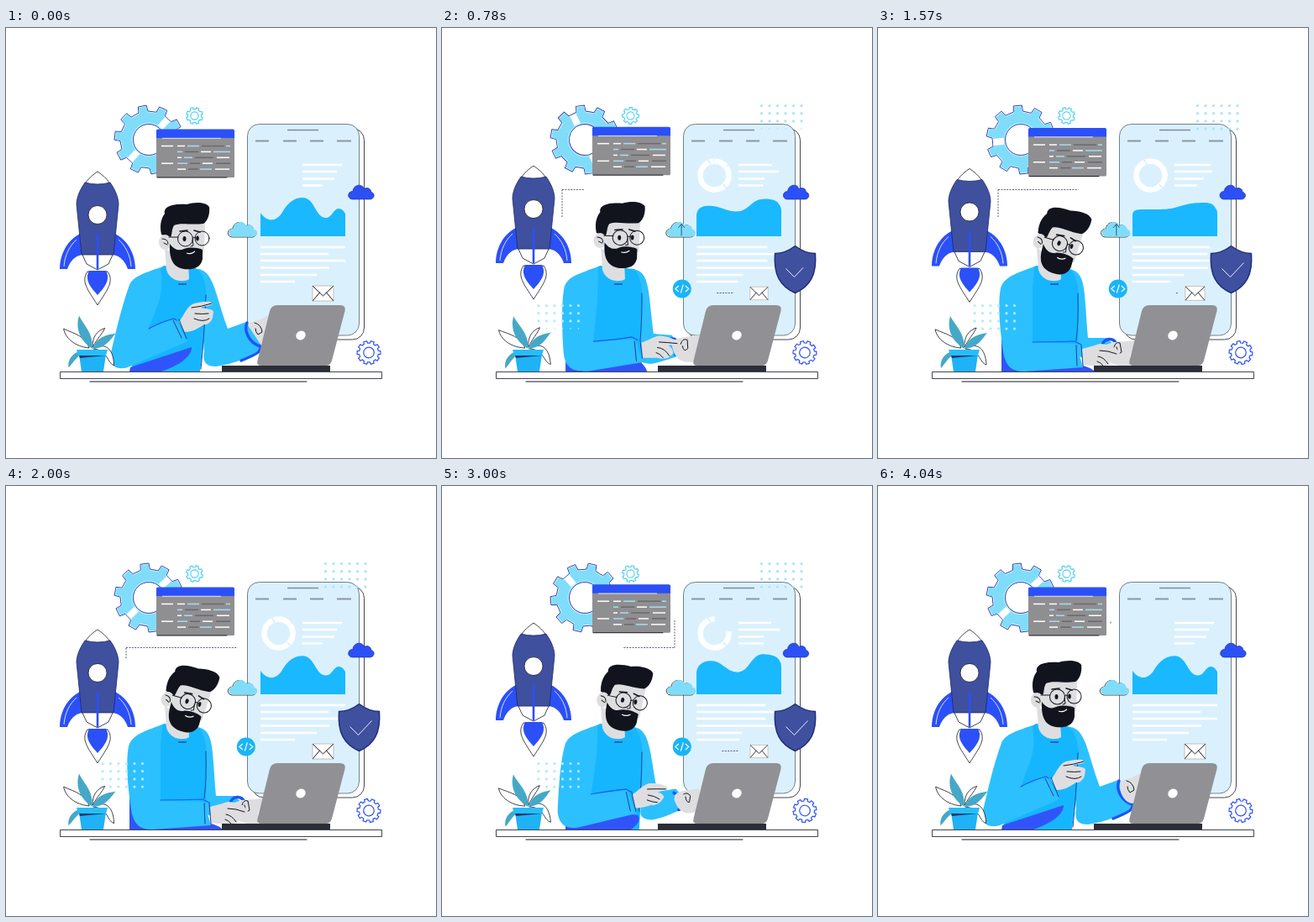
An HTML page for the animation above (4.09 s loop, 512 by 512 pixels).

```html
<!DOCTYPE html>
<html lang="en">
<head>
<meta charset="utf-8">
<title>Developer at work</title>
<style>
  html, body { margin: 0; width: 100%; height: 100%; overflow: hidden; background: #fff; }
  svg { display: block; width: 100vw; height: 100vh; }
  .ink { fill: none; stroke: #15171f; stroke-width: 1; stroke-linecap: round; stroke-linejoin: round; }
  .line { fill: #fff; stroke: #15171f; stroke-width: .8; stroke-linejoin: round; }
  .skin { fill: #dedee0; }
  .hair { fill: #11141d; }
  .sleeve { fill: #2cc0ff; }
  .shirt { fill: #16b6ff; }
  .royal { fill: #2b50f8; }
  .cyan { fill: #80ddfa; }
  .edge { fill: none; stroke: #1c55f5; stroke-width: 1.2; stroke-linecap: round; }
  .dots { fill: none; stroke: #57607a; stroke-width: 1; stroke-dasharray: 2 1.4; }
  .white { fill: none; stroke: #fff; }
</style>
</head>
<body>
<svg viewBox="0 0 512 512">
  <defs>
    <path id="cloud" d="M5 18C-2 17-1 8 6 8C7-1 19-2 21 5C26 2 31 6 30 9C36 10 35 18 29 18Z"/>
    <path id="fin" d="M88 245C74 252 64 268 64 287L73 287C76 278 82 271 91 270Z"/>
  </defs>

  <!-- gears -->
  <g id="bigGear">
    <path data-gear="10 41 34 7 9.5" fill="#fff" stroke="#2038a8" stroke-width=".9"/>
    <path data-gear="10 39.800 32.800 6.500 9" class="cyan"/>
    <path d="M0-33V-20M0 33V20" class="white" stroke-width="8"/>
    <circle r="20" fill="#c9f0fc"/>
    <circle r="18.500" fill="#fff" stroke="#2038a8" stroke-width=".9"/>
  </g>
  <g id="topGear" fill="none" stroke="#45cdf5" stroke-width="1.1">
    <path data-gear="8 10 8 9 13"/><circle r="4.600"/>
  </g>
  <g id="lowGear" fill="none" stroke="#2b50f8" stroke-width="1.2">
    <path data-gear="10 14 11.5 8 11"/><circle r="6.300"/>
  </g>

  <!-- code window -->
  <path id="route" class="dots"/>
  <g id="win">
    <rect x="179" y="121" width="93" height="57" rx="1.500" fill="#8f8f92"/>
    <path d="M180 178H263" class="ink"/>
    <path d="M179 131V122.500Q179 120.500 181 120.500H270Q272 120.500 272 122.500V131Z" class="royal"/>
    <path d="M186 131.300H256" class="white" stroke="#c8cbe0" stroke-width=".8"/>
    <g id="code" stroke-width="1.500"></g>
  </g>

  <!-- phone -->
  <rect x="293" y="119.500" width="133.500" height="251.500" rx="14" class="line"/>
  <rect x="287.500" y="114.500" width="133" height="251.500" rx="14" fill="#daf1fd" stroke="#55606e" stroke-width=".8"/>
  <path d="M335 121.500H372" stroke="#7d8b96" stroke-width="1.400"/>
  <path d="M297 134.500h16M330 134.500h16M362 134.500h16M394 134.500h17" stroke="#8b979f" stroke-width="1.800"/>
  <path id="chart" fill="#1ab8ff"/>
  <path id="text" class="white" stroke-width="2.600"/>
  <path id="ring" class="white" stroke-width="6.500"/>
  <path d="M316 156l4 6M339 164l5-3M335 186l4 5" stroke="#daf1fd" stroke-width="1.800"/>
  <path id="link" class="dots"/>
  <g id="mail"><path d="M-12.500-9H12.500V9H-12.500Z" fill="#fff" stroke="#b9aea6" stroke-width=".8"/>
    <path d="M-12-8.500L0 3L12-8.500M-12 8.500L-4-1M12 8.500L4-1" class="ink" stroke-width=".8"/></g>

  <g id="shield">
    <path d="M0-28C8-22 16-19 24-19C26 6 18 20 0 28C-18 20-26 6-24-19C-16-19-8-22 0-28Z" fill="#3f509f" stroke="#202c78" stroke-width="1.400"/>
    <path id="check" d="M-11-1L-1 9L15-8" class="white" stroke-width=".9" pathLength="1"/>
  </g>
  <g id="badge"><circle r="11" fill="#1ab4fb"/>
    <path d="M-4-3.500L-8 0L-4 3.500M4-3.500L8 0L4 3.500M1.500-5L-1.500 5" class="white" stroke-width="1.100"/></g>

  <!-- clouds -->
  <g id="leftCloud"><use href="#cloud" class="line" x="-1" y=".5"/><use href="#cloud" class="cyan"/>
    <path id="arrow" d="M17.500 16.500V3M14 7L17.500 3L21 7" class="ink" style="stroke:#1d5f80"/></g>
  <g id="rightCloud"><use href="#cloud" class="royal" transform="scale(.9 .95)" stroke="#2030a8" stroke-width=".8"/></g>

  <!-- rocket -->
  <g id="rocket">
    <path d="M97 290C89 302 97 311 109 330C121 311 129 302 121 290Z" class="line"/>
    <path d="M99 289H119C125 300 117 309 109 318C101 309 93 300 99 289Z" class="royal"/>
    <g id="wing"><use href="#fin" class="royal"/><path d="M69 284C70 270 76 259 84 252" class="white" stroke-width=".8"/></g>
    <use href="#wing" transform="matrix(-1 0 0 1 218 0)"/>
    <path d="M90 268L96 281L109 288L122 281L128 268Z" class="line"/>
    <path d="M109 171C100 177 95 183 93 188H125C123 183 118 177 109 171Z" class="line"/>
    <path d="M94 184Q109 188 124 184C131 194 134 203 134 210L128 270H90L84 210C84 203 87 194 94 184Z" fill="#3f509f" stroke="#1c2764" stroke-width=".8"/>
    <circle cx="109" cy="222.500" r="11" class="line"/>
    <path d="M109 246V286" stroke="#2b50f8" stroke-width="2.600" stroke-linecap="round"/>
  </g>

  <!-- man -->
  <path data-pose="farArm" class="sleeve"/>
  <path data-pose="farCuff" class="edge" style="stroke-width:3.400"/>
  <path data-pose="farHand" class="skin"/>
  <path data-pose="farLines" class="ink"/>
  <path data-pose="torso" class="shirt"/>
  <path data-pose="shade" fill="#3154fa"/>
  <path data-pose="seam" class="ink" style="stroke:#164a9c"/>
  <path d="M189 262L217 278L218 299C212 303 196 303 191 288Z" class="skin"/>
  <path d="M205 305H215" stroke="#164a9c" stroke-width="1.400"/>
  <g id="head">
    <path d="M195 232L237 230L236 268L198 272Z" class="skin"/>
    <path d="M185 246C182 233 186 225 189 221C187 212 200 209 215 210C225 207 238 207 242 213C243 222 240 230 235 233C220 235 208 231 200 235C197 240 198 246 196 249Z" class="hair"/>
    <ellipse cx="189.500" cy="255" rx="7.500" ry="9" class="skin"/>
    <path d="M186 251Q193 251 193 257M188 256L192 258" class="ink"/>
    <path d="M195 257C200 264 206 266 212 263C220 260 230 262 234 264V275C232 287 220 288 212 287C200 285 194 277 195 257Z" class="hair"/>
    <path d="M215 268Q220 270 225 266" class="white" stroke-width="1.200"/>
    <g class="ink"><circle cx="213.500" cy="251" r="9"/><circle cx="233.500" cy="250.500" r="8.500"/>
      <path d="M222 250Q224 248 226 250M205 249L194 249M222 252L223 259L220 260"/></g>
    <path d="M207 242L216 241M224 241L231 243" class="ink" style="stroke-width:1.600"/>
    <ellipse cx="212.500" cy="251" rx="2" ry="3" class="hair"/>
    <ellipse cx="228" cy="250.500" rx="1.800" ry="3" class="hair"/>
  </g>
  <path data-pose="hand" class="skin"/>
  <path data-pose="fingers" class="ink"/>
  <path data-pose="arm" class="sleeve"/>
  <path data-pose="fold" class="edge"/>
  <path data-pose="cuff" class="ink" style="stroke:#153f9a"/>
  <g id="dotGrids"></g>

  <!-- desk -->
  <path d="M323 330H398Q405 330 403.500 337L388 396Q386 402 381 402H304Q298 402 299.500 396L314 337Q316 330 323 330Z" fill="#919195"/>
  <ellipse cx="351" cy="366" rx="6" ry="5.300" transform="rotate(-40 351 366)" fill="#fff"/>
  <path d="M257 402H386V409H257Z" fill="#2b2d37"/>
  <path d="M64.500 409.500H447.500V417.500H64.500Z" class="line"/>
  <path d="M100 421H358" class="ink"/>

  <!-- plant -->
  <g id="leaves">
    <path d="M99 381C94 367 82 365 68 359C70 370 82 380 99 381ZM103 380C102 368 108 360 117 357C114 364 108 370 103 380Z" class="line"/>
    <path d="M104 382C116 374 128 379 129 401C120 398 122 383 104 382Z" class="line"/>
    <path d="M103 382C86 372 82 356 86 343C92 355 103 362 103 382ZM103 382C108 368 118 365 130 363C124 370 119 381 103 382ZM99 383C84 383 73 392 75 405C81 399 84 390 99 383Z" fill="#45a8c8"/>
  </g>
  <path d="M87 389H119L116 409H90Z" fill="#1fb2f6"/>
  <path d="M87 390H119L88 393Z" fill="#123b6b"/>
  <path d="M84 383H121L119 390H86Z" fill="#27bdf8"/>
</svg>
<script>
const LOOP = 4090;
const $ = id => document.getElementById(id);
const set = (id, name, value) => $(id).setAttribute(name, value);
const clamp = x => Math.max(0, Math.min(1, x));
const ramp = (t, from, to) => clamp((t - from) / (to - from));
const ease = x => x * x * (3 - 2 * x);

// Blends every number of two strings with the same layout.
function mix(a, b, k) {
  const ends = b.match(/-?[\d.]+/g);
  let i = 0;
  return a.replace(/-?[\d.]+/g, n => (+n + (ends[i++] - n) * k).toFixed(2));
}
function track(keys, t) {
  const i = Math.max(1, keys.findIndex(key => key[0] >= t));
  const [from, a] = keys[i - 1], [to, b] = keys[i];
  return mix(a, b, ease(ramp(t, from, to)));
}

// Each part: hand raised, sitting up, typing.
const poses = {
  farArm: ['M228 287C248 288 250 322 264 358L286 350L306 375C303 390 270 400 250 403C236 403 234 395 236 385L228 287Z',
    'M228 287C247 290 246 315 254 358L276 362L290 398C280 404 262 406 250 408C236 408 232 405 233 398L228 287Z',
    'M228 287C248 291 245 310 250 369L272 369L284 380C270 384 262 390 250 393C240 393 236 390 237 385L228 287Z'],
  farHand: ['M288 354C292 348 300 349 305 346L318 339L310 370L304 378C294 378 287 366 288 354Z',
    'M279 368C284 360 296 362 310 357L305 380L300 392C290 394 282 390 279 368Z',
    'M268 380C276 372 292 374 306 372L300 390L300 402C280 404 272 398 268 380Z'],
  farCuff: ['M287 351C283 360 289 375 303 379C304 385 300 388 280 396',
    'M275 364C283 366 290 380 291 390C291 398 282 401 272 403',
    'M267 377C270 369 280 368 284 376C284 377 283 377 283 377'],
  farLines: ['M296 351Q304 353 305 362L300 365Q297 362 297 358', 'M288 372Q290 364 297 367L296 376Q290 384 289 377', 'M281 380Q283 373 288 375L290 386Q286 390 284 380'],
  torso: ['M188 283L226 286C234 290 238 304 239 318C238 345 235 380 231 409L148 409C160 370 165 330 160 300Z',
    'M188 283L228 287C234 291 238 304 238 318C238 345 236 380 232 409L148 409C160 370 165 330 160 300Z',
    'M188 283L229 287C235 292 238 304 239 318C239 345 238 380 238 409L148 409C148 370 160 330 160 300Z'],
  shade: ['M147 409L148 404L221 380C221 392 205 402 185 409Z', 'M147 409L148 403L228 392C230 400 229 405 228 409Z', 'M147 409L147 362L244 402C250 404 255 405 258 409Z'],
  seam: ['M238 318Q236 370 232 406', 'M238 316Q237 350 236 372', 'M238 316Q239 350 236 372'],
  hand: ['M206 350C212 342 216 330 224 328C232 326 243 324 246 328C246 331 236 331 232 333C238 334 247 335 247 338L246 345C244 350 240 354 236 353C228 358 222 362 213 362Z',
    'M231 366C240 362 244 356 252 355C262 356 272 358 276 361C276 364 266 364 262 365C268 368 272 375 270 378L266 382C262 384 256 384 254 382C248 382 242 382 233 383Z',
    'M243 382C252 380 258 378 264 376C274 376 286 382 288 386C289 389 280 388 276 389C280 392 280 396 278 398L272 402C266 403 262 403 260 402C254 402 250 402 244 401Z'],
  fingers: ['M221 333Q232 332 245 328M225 340Q234 341 241 340M224 346Q235 351 242 346', 'M252 362Q262 363 275 361M250 368Q261 368 267 379M248 374Q254 376 258 382', 'M264 384Q274 384 284 388M262 391Q269 392 274 400M261 397Q265 398 268 402'],
  arm: ['M184 285C160 293 151 297 147 306C138 330 130 365 124 391C124 405 135 407 145 404L216 373L201 346L170 358C176 340 184 325 185 310C186 300 184 290 184 285Z',
    'M186 284C165 292 148 295 145 308C141 330 140 365 140 391C141 406 150 410 175 408L233 391L222 364L176 372C180 350 186 330 187 312C187 300 186 290 186 284Z',
    'M186 284C165 292 150 296 146 310C142 330 146 365 149 385C152 404 160 409 175 409L244 404L236 376L184 374C184 350 184 330 184 312C185 300 186 290 186 284Z'],
  fold: ['M170 358Q184 350 200 346L203 348', 'M176 372Q198 369 216 362L222 365', 'M184 374Q210 374 234 373L242 377'],
  cuff: ['M199 348L209 369M206 347L215 370', 'M221 367L225 390M229 366L232 383', 'M236 378L237 402M242 378L244 402']
};
const poseTimes = [[0, 0], [480, 1], [1050, 2], [2650, 2], [3400, 0], [LOOP, 0]];
const headKeys = [[0, 0, 0, 0], [480, -4, -5.5, -6], [1090, 1, 3, 9], [1570, 0, 5, 16], [2520, 0, 5, 16], [3480, 1, 2.5, 6], [LOOP, 0, 0, 0]]
  .map(([t, x, y, turn]) => [t, `translate(${x} ${y}) rotate(${turn} 213 262)`]);
const hills = ['M303 220C310 230 320 232 328 221C336 206 345 202 353 202C368 202 368 226 381 226C388 226 390 215 396 215C400 215 402 218 404 221V248H303Z',
  'M303 222C304 216 309 216 315 216C330 216 345 217 354 214C364 211 372 208 382 208C394 207 399 209 401 213C403 216 404 218 404 220V248H303Z',
  'M303 222C305 210 314 208 321 208C334 208 338 222 352 222C366 222 368 200 382 200C392 200 400 203 402 208C404 210 404 213 404 216V248H303Z'];
const hillKeys = [0, 1, 2, 1, 0].map((shape, i) => [i * LOOP / 8, hills[shape]]);
// x, y, and the two reaches each text line swings between
const textLines = [[353, 163, 400, 392], [353, 171, 394, 402], [353, 179.5, 391, 383], [353, 187.5, 377, 383],
  [303, 261, 404, 385], [303, 269, 384, 403], [303, 277, 404, 385], [303, 285.5, 385, 403], [303, 294, 370, 357], [303, 302, 344, 354]];

for (const el of document.querySelectorAll('[data-gear]')) {
  const [count, outer, root, tip, base] = el.dataset.gear.split(' ').map(Number);
  const points = [];
  for (let i = 0; i < count; i++)
    for (const [r, off] of [[root, -base], [outer, -tip], [outer, tip], [root, base]]) {
      const a = ((i + .5) * 360 / count + off) * Math.PI / 180;
      points.push((r * Math.sin(a)).toFixed(2) + ' ' + (-r * Math.cos(a)).toFixed(2));
    }
  el.setAttribute('d', 'M' + points.join('L') + 'Z');
}

// Code lines: start, tone, width
const tones = { w: '#fff', c: '#a5ddf3', d: '#6a6a6e' };
['185w14 204w9 216c14 233d27 262c5', '204c6 213d16 232w12 247c20', '204w5 212c10 225d22 251w15',
  '185w14 204c12 219d12 234w12 250d17', '204w10 217d12 231c14 249w17'].forEach((row, i) => {
  for (const [, x, tone, width] of row.matchAll(/(\d+)([wcd])(\d+)/g))
    $('code').innerHTML += `<path d="M${x} ${140.5 + 6.9 * i}h${width}" stroke="${tones[tone]}"/>`;
});

const dots = [];
for (const [x, y, fill] of [[380.5, 92.5, '#a8e4fa'], [115, 330.5, '#b5eafc']])
  for (let i = 0; i < 24; i++) {
    const dot = document.createElementNS('http://www.w3.org/2000/svg', 'circle');
    const row = Math.floor(i / 6);
    dot.setAttribute('cx', x + i % 6 * 9.5);
    dot.setAttribute('cy', y + row * 9.2);
    dot.setAttribute('fill', fill);
    $('dotGrids').append(dot);
    dots.push([dot, row]);
  }

// Piece of a bent line between two distances from its start.
function trim(points, from, to) {
  let at = 0, d = '';
  for (let i = 1; i < points.length; i++) {
    const [x, y] = points[i - 1], [u, v] = points[i];
    const length = Math.hypot(u - x, v - y);
    const a = clamp((from - at) / length), b = clamp((to - at) / length);
    if (b > a) d += `M${x + (u - x) * a} ${y + (v - y) * a}L${x + (u - x) * b} ${y + (v - y) * b}`;
    at += length;
  }
  return d;
}
function arc(cx, cy, r, from, to) {
  if (to - from < .01) return '';
  const points = [];
  for (let i = 0; i <= 48; i++) {
    const a = (from + (to - from) * i / 48) * 2 * Math.PI;
    points.push((cx + r * Math.sin(a)).toFixed(2) + ' ' + (cy - r * Math.cos(a)).toFixed(2));
  }
  return 'M' + points.join('L');
}
const place = (id, x, y, scale = 1, turn = 0) =>
  set(id, 'transform', `translate(${x} ${y}) rotate(${turn}) scale(${scale})`);

function draw(t) {
  const half = t % (LOOP / 2);
  const swing = (1 - Math.cos(t / LOOP * 4 * Math.PI)) / 2;
  const turn = 360 * t / LOOP;

  place('bigGear', 170, 133, 1, 43 - turn);
  place('topGear', 224.5, 104.5, 1, turn);
  place('lowGear', 432, 386.5, 1, -turn);
  place('rocket', 0, -8 * swing);
  place('win', 0, -3.3 * swing);
  place('leftCloud', 265 + 3 * swing, 230.5);
  place('rightCloud', 407.5 - 1.5 * swing, 186.8);
  place('mail', 377.5, 316, 1 - .16 * swing);
  set('leaves', 'transform', `rotate(${1.5 - 3 * swing} 102 384)`);

  set('chart', 'd', track(hillKeys, half));
  set('text', 'd', textLines.map(([x, y, a, b]) => `M${x} ${y}H${a + (b - a) * swing}`).join(''));
  set('ring', 'd', arc(324.5, 175.5, 17, ease(ramp(t, 2750, 3560)), ease(ramp(t, 150, 810))));

  const inOut = (a, b, c, d) => ease(ramp(t, a, b)) * (1 - ease(ramp(t, c, d)));
  place('shield', 420.5, 287.5, inOut(220, 580, 3260, 3680));
  set('check', 'stroke-dasharray', ramp(t, 520, 850) + ' 2');
  set('check', 'opacity', t > 520 ? 1 : 0);
  place('badge', 285.8, 310.5, inOut(160, 420, 3150, 3400));
  set('arrow', 'opacity', inOut(430, 470, 780, 900) + inOut(1400, 1500, 1750, 1870));

  set('route', 'd', trim([[143, 225], [143, 192.5], [277, 192.5], [277, 160]], (t - 1770) * .086, (t - 90) * .0865));
  set('link', 'd', trim([[320, 315.5], [358, 315.5]], (half - 575) * .035, (half - 90) * .038));
  for (const [dot, row] of dots)
    dot.setAttribute('r', 1.6 * clamp((t - 200 - row * 160) / 200) * clamp((3720 - row * 160 - t) / 200));

  for (const el of document.querySelectorAll('[data-pose]'))
    el.setAttribute('d', track(poseTimes.map(([at, i]) => [at, poses[el.dataset.pose][i]]), t));
  set('head', 'transform', track(headKeys, t));
}

function frame(now) {
  draw(now % LOOP);
  requestAnimationFrame(frame);
}
draw(0);
requestAnimationFrame(frame);
</script>
</body>
</html>
```
